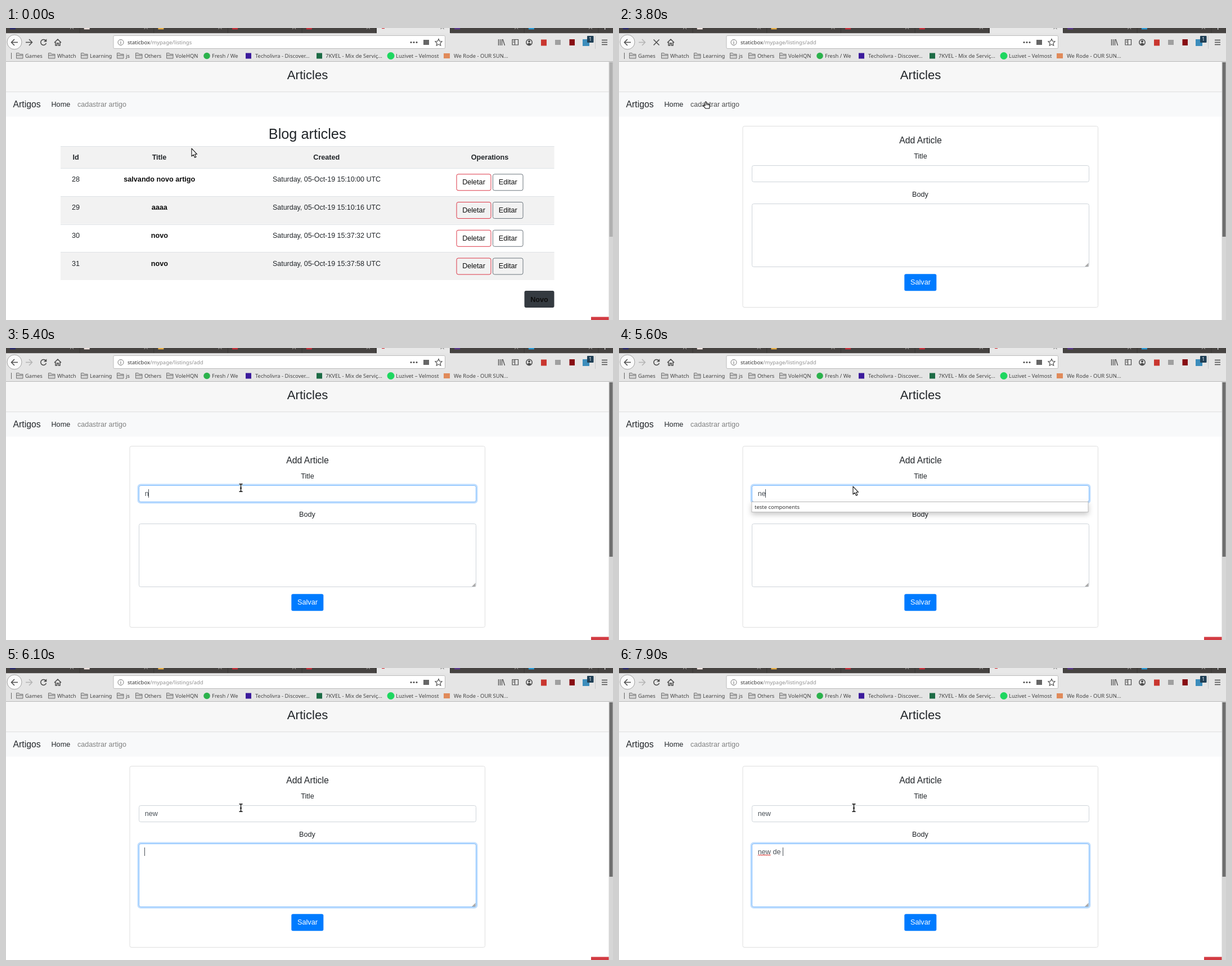
Recreate the animation shown at these times as an HTML page. Size 1079 px wide and 519 px high, loop 8 s.

```html
<!DOCTYPE html>
<html lang="pt">
<head>
<meta charset="utf-8">
<title>Articles</title>
<style>
html, body { margin: 0; width: 100%; height: 100%; overflow: hidden; background: #fff; }
svg { display: block; width: 1079px; height: 519px; }
text { font: 12.64px "Liberation Sans", Arial, sans-serif; fill: #212529; white-space: pre; }
.ui { font: 9.45px "Noto Sans", sans-serif; fill: #444; }
.mid { text-anchor: middle; }
.b { font-weight: bold; fill: #0c0c0c; }
.ico { fill: none; stroke: #4c4c4c; stroke-width: 1.5; }
.field { fill: #fff; stroke: #ced4da; }
.glow { fill: none; stroke: #bfdeff; stroke-width: 2.5; }
.edge { fill: none; stroke: #80bdff; }
#drop rect { fill: #fff; stroke: #bdbdbd; filter: drop-shadow(0 4px 5px rgba(0, 0, 0, .22)); }
.cur { fill: #fff; stroke: #111; stroke-width: 1.1; stroke-linejoin: round; }
</style>
</head>
<body>
<svg id="stage" viewBox="0 0 1079 519"></svg>
<script>
const LOOP = 8000, TICK = 100;

const rect = (x, y, w, h, fill, more = '') =>
  `<rect x="${x}" y="${y}" width="${w}" height="${h}" fill="${fill}" ${more}/>`;
const text = (x, y, s, cls = '', style = '') =>
  `<text x="${x}" y="${y}" class="${cls}" style="${style}">${s}</text>`;
const mid = (x, y, s, cls = '', style = '') => text(x, y, s, 'mid ' + cls, style);
const icon = (d, more = '') => `<path class="ico" d="${d}" ${more}/>`;
const dot = (x, y, r, fill) => `<circle cx="${x}" cy="${y}" r="${r}" fill="${fill}"/>`;
const group = (id, body) => `<g id="${id}">${body}</g>`;

function tabs() {
  const marks = ['#2b2a6b', '#f0e4e0', '#e8b04a', '#c8323c', '#c8323c', '', '#5c3a8e', '#2c9bd6'];
  let out = rect(0, 0, 1079, 9.5, '#464341') + rect(659, 0, 131, 10, '#e8e8e8');
  marks.forEach((fill, i) => {
    const x = i * 131.7;
    const ink = i === 5 ? '#555' : '#c9c7c5';
    if (fill) out += rect(x + 7, 0, 10, 2.5, fill);
    out += icon(`M${x + 114} 2l3-3 3 3`, `style="stroke:${ink};stroke-width:1"`);
    out += rect(x + 130.5, 0, 1, 9, '#393735');
  });
  return out + rect(1064, 0, 1.3, 3, '#ddd') + group('favicon', rect(668, 0, 5, 1.2, '#d33c43'));
}

function toolbar() {
  const back = dot(15, 25, 13, '#fafafa') +
    '<circle cx="15" cy="25" r="13" fill="none" stroke="#a3a3a3"/>' +
    icon('M21 25.5H9.5M15 20l-5.5 5.5L15 31');
  const home = icon('M86 26l6-6 6 6M88 25v6h2.6v-4h2.8v4H96v-6');
  const info = '<circle cx="204" cy="25.5" r="5" class="ico" style="stroke:#777;stroke-width:1"/>' +
    rect(203.5, 24.5, 1, 4, '#666') + rect(203.5, 22.5, 1, 1, '#666');
  const star = icon('M769 19.5l1.8 4 4.2.5-3.1 2.9.8 4.3-3.7-2.1-3.7 2.1.8-4.3-3.1-2.9 4.2-.5z',
    'style="stroke-width:1.2"');
  const library = icon('M875.5 20v11M878.5 20v11M881.5 20v11M883 20l3.5 11', 'style="stroke-width:1.3"');
  const side = icon('M900 20.5h10.5v9.5h-10.5zM904.5 20.5v9.5M901.5 23h2M901.5 25.5h2', 'style="stroke-width:1.2"');
  const user = '<circle cx="930" cy="25.5" r="5.2" class="ico"/>' + dot(930, 23.8, 2, '#4c4c4c') +
    '<path d="M926.5 28.5q3.5-4 7 0l-3.5 2.5z" fill="#4c4c4c"/>';
  return rect(0, 9.5, 1079, 50.5, '#e5e5e5') + rect(0, 59, 1079, 1, '#b9b9b9') +
    rect(191, 13.5, 589.5, 23, '#fff', 'rx="2" stroke="#bcbcbc"') +
    back + home + info + star + library + side + user +
    group('forward', icon('M35 25.5h11.5M41 20l5.5 5.5L41 31', 'style="stroke:inherit"')) +
    group('reload', icon('M70.6 22.2A5 5 0 1 0 71.5 27') + '<path d="M67 24.5h5.3v-5.3z" fill="#4c4c4c"/>') +
    group('halt', icon('M61.5 20.5l10 10M71.5 20.5l-10 10')) +
    [720, 725, 730].map(x => dot(x, 25.5, 1.5, '#4c4c4c')).join('') +
    rect(742, 21, 10, 9, '#666') +
    rect(951, 20.5, 10, 11, '#c9362f') + rect(976, 21, 10, 9, '#a0a0a0') +
    rect(1001.5, 20, 9.5, 11, '#870d12') + rect(1025, 20, 12, 12, '#3c8dbc') +
    rect(1033, 14, 11.5, 12, '#1f3f55', 'rx="1"') +
    text(1036.2, 23.3, '1', 'ui', 'fill:#fff;font-size:8.5px') +
    rect(1047, 14, 1, 23, '#cbcbcb') +
    icon('M1059 21.5h10M1059 25.5h10M1059 29.5h10') +
    '<text x="216" y="29" class="ui" style="fill:#333">staticbox<tspan id="path" fill="#909090"></tspan></text>';
}

function bookmarks() {
  const folders = [[18, 'Games'], [75, 'Whatch'], [133, 'Learning'], [197, 'js'], [230, 'Others'], [285, 'VoleHQN']];
  const links = [
    [366, 'Fresh / We'], [443, 'Techolivra - Discover...'], [568, '7KVEL - Mix de Serviç...'],
    [693, 'Luzivet – Velmost'], [796, 'We Rode - OUR SUN...']
  ];
  const folder = x => `<path d="M${x + .5} 54V44.5h4.5l1.5 2h5.5V54zM${x + .5} 48.5h11.5" fill="#d2d2d2" stroke="#737373"/>`;
  return rect(9, 44, 1, 11, '#666') +
    folders.map(([x, s]) => folder(x) + text(x + 16, 53, s, 'ui')).join('') +
    links.map(([x, s]) => text(x, 53, s, 'ui')).join('') +
    dot(357, 49.5, 5.8, '#2bb24c') + rect(426, 44.5, 10, 10, '#3b1a9c') +
    rect(552, 44.5, 10, 10, '#1c6b45') + dot(684, 49.5, 6.5, '#1ed760') + rect(778, 45, 11, 9, '#e08a5a');
}

function pageTop() {
  return rect(0, 60, 1072, 53, '#f7f7f7') + rect(0, 113, 1072, 1, '#dfdfdf') + rect(0, 114, 1072, 43.5, '#f8f9fa') +
    mid(536, 91, 'Articles', '', 'font-size:22.1px') +
    text(12.5, 141, 'Artigos', '', 'font-size:15.8px') +
    text(80.5, 140, 'Home') +
    '<text id="link" x="127" y="140" style="font-size:12.5px">cadastrar artigo</text>';
}

function button(x, y, w, label, stroke) {
  return rect(x + .5, y + .5, w - 1, 29, 'none', `rx="3" stroke="${stroke}"`) +
    mid(x + w / 2, Math.round(y + 18.9), label, '', 'fill:#0c0c0c');
}

function listPage() {
  const rows = [
    [28, 'salvando novo artigo', '10:00'], [29, 'aaaa', '10:16'],
    [30, 'novo', '37:32'], [31, 'novo', '37:58']
  ];
  const heads = [[124, 'Id'], [272.5, 'Title'], [569.8, 'Created'], [860, 'Operations']];
  let out = mid(535.7, 197, 'Blog articles', '', 'font-size:25.3px') +
    rect(97, 210, 877.5, 39, '#f2f2f2') + rect(97, 210, 877.5, 1, '#dee2e6') +
    heads.map(([x, s]) => mid(x, 234, s, 'b', 'fill:#212529')).join('');
  rows.forEach(([id, name, time], i) => {
    const y = 249 + i * 49.75, base = Math.round(y + 24.3);
    if (i % 2) out += rect(97, y, 877.5, 49.75, '#f2f2f2');
    out += rect(97, Math.round(y), 877.5, 1, '#dee2e6') +
      mid(124, base, id) + mid(272.8, base, name, 'b') +
      mid(570, base, `Saturday, 05-Oct-19 15:${time} UTC`, '', 'font-size:12.45px') +
      button(800.5, y + 10.3, 62, 'Deletar', '#dc3545') +
      button(865, y + 10.3, 54.5, 'Editar', '#6c757d');
  });
  return out + rect(921.5, 467, 53, 30, '#343a40', 'rx="3"') + mid(948, 487, 'Novo', 'b');
}

function field(id, y, h) {
  const box = (cls, d) =>
    `<rect class="${cls}" x="${236.5 - d}" y="${y + .5 - d}" width="${599 + 2 * d}" height="${h - 1 + 2 * d}" rx="${3 + d}"/>`;
  return box('field', 0) + group(id + 'Focus', box('glow', 1.75) + box('edge', 0)) +
    `<text id="${id}" x="246.8" y="${y + 19}" style="fill:#495057"></text>`;
}

function formPage() {
  const wave = 'M247 333.5' + 'l1.5-2 1.5 2'.repeat(7) + 'l1.5-2';
  return rect(220, 174.5, 631.5, 322, '#fff', 'rx="3" stroke="#dfdfdf"') +
    mid(536, 205, 'Add Article', '', 'font-size:15.8px') +
    mid(536, 232, 'Title') + mid(535.5, 300, 'Body') +
    field('title', 244, 30) + field('body', 312, 113) +
    '<path d="M828 424l6.5-6.5V424z" fill="#a9a9a9"/>' +
    `<path id="wave" d="${wave}" fill="none" stroke="#d9231d" stroke-width=".9"/>` +
    rect(507.3, 437.3, 57, 30, '#007bff', 'rx="3"') + mid(536, 456, 'Salvar', '', 'fill:#fff') +
    '<rect id="caret" width="1" height="15" fill="#495057"/>' +
    group('drop', rect(236, 273.5, 598, 18, '#fff') + text(241, 286, 'teste components', 'ui', 'fill:#333'));
}

function pointer() {
  const arrow = '<path class="cur" d="M0 0V14L3.3 11.2 5.6 16.3 7.9 15.2 5.6 10.3H9.6Z"/>';
  const hand = '<path class="cur" d="M-1 .8Q.3-.6 1.5.9V4L6 4.6Q7.4 5 7.3 6.6L6.6 12H-.3L-3.8 7.4Q-4 5.8-2.4 6L-1 7.2Z"/>' +
    '<path d="M1.5 4.5v2M3.7 5v1.7M5.6 5.3v1.6" stroke="#111" stroke-width=".8"/>';
  const beam = 'M-1.5 -4Q1.5 -5 1.5 -3V8Q1.5 10 -1.5 9M4.5 -4Q1.5 -5 1.5 -3M1.5 8Q1.5 10 4.5 9M-.1 3H3.1';
  const ibeam = `<path d="${beam}" fill="none" stroke="#fff" stroke-width="3"/>` +
    `<path d="${beam}" fill="none" stroke="#111" stroke-width="1.5"/>`;
  return group('pointer', group('arrow', arrow) + group('hand', hand) + group('ibeam', ibeam));
}

document.getElementById('stage').innerHTML = rect(0, 0, 1079, 519, '#fff') +
  tabs() + toolbar() + bookmarks() + pageTop() +
  group('list', listPage()) + group('form', formPage()) +
  group('badge', rect(1040, 513.5, 32, 5.5, '#d33c43')) +
  rect(1071.5, 60, 7.5, 459, '#d6d6d6') + '<rect id="thumb" x="1072.5" y="61" width="6" height="310"/>' + pointer();

const $ = id => document.getElementById(id);
const show = (id, on) => $(id).setAttribute('visibility', on ? 'inherit' : 'hidden');
const pen = document.createElement('canvas').getContext('2d');
pen.font = '12.64px "Liberation Sans", Arial, sans-serif';

const titleKeys = [[0, ''], [5400, 'n'], [5600, 'ne'], [5700, 'new']];
const bodyKeys = [[0, ''], [6300, 'n'], [6600, 'ne'], [6900, 'new '], [7800, 'new d'], [7900, 'new de ']];
const path = [[800, 330, 214], [1300, 154, 131], [3900, 154, 131], [4600, 416, 246]];

const at = (keys, t) => keys.filter(k => k[0] <= t).pop()[1];
const clamp = v => Math.max(0, Math.min(1, v));
const ease = v => v * v * (3 - 2 * v);

function position(t) {
  let [, x, y] = path[0];
  for (let i = 1; i < path.length; i++) {
    const [t0, x0, y0] = path[i - 1], [t1, x1, y1] = path[i];
    if (t < t0) break;
    const k = ease(clamp((t - t0) / (t1 - t0)));
    x = x0 + (x1 - x0) * k;
    y = y0 + (y1 - y0) * k;
  }
  return [x, y];
}

function draw(t) {
  const adding = t >= 3800, loading = adding && t < 3900;
  const menu = t >= 5500 && t < 5700;
  show('list', !adding);
  show('form', adding);
  show('halt', loading);
  show('reload', !loading);
  show('favicon', !loading);
  show('badge', !loading);
  show('drop', adding && menu);
  show('wave', adding && t >= 6900);
  $('forward').setAttribute('stroke', adding ? '#b4b4b4' : '#4c4c4c');
  $('thumb').setAttribute('fill', adding ? '#6e6e6e' : '#b0b0b0');
  $('path').textContent = '/mypage/listings' + (adding ? '/add' : '');

  const [x, y] = position(t);
  const onLink = x > 127 && x < 214 && y > 124 && y < 147;
  const onField = adding && x > 236 && y > 244 && !menu;
  $('pointer').setAttribute('transform', `translate(${x} ${y})`);
  show('hand', onLink);
  show('ibeam', onField);
  show('arrow', !onLink && !onField);
  $('link').style.fill = onLink ? '#4c4d4d' : '#7f8080';

  const title = at(titleKeys, t), body = at(bodyKeys, t);
  const inBody = t >= 6000;
  const leave = ease(clamp((t - 5900) / 200));
  $('title').textContent = title;
  $('body').textContent = body;
  $('titleFocus').setAttribute('opacity', ease(clamp((t - 4700) / 300)) * (1 - leave));
  $('bodyFocus').setAttribute('opacity', leave);
  $('caret').setAttribute('x', Math.floor(246.9 + pen.measureText(inBody ? body : title).width));
  $('caret').setAttribute('y', inBody ? 319 : 251);
  show('caret', t >= 4800 && !(t >= 7200 && t < 7800));
}

let last = -1;
const start = performance.now();
function frame() {
  const tick = Math.floor((performance.now() - start) % LOOP / TICK);
  if (tick !== last) draw((last = tick) * TICK);
  requestAnimationFrame(frame);
}
frame();
</script>
</body>
</html>
```
